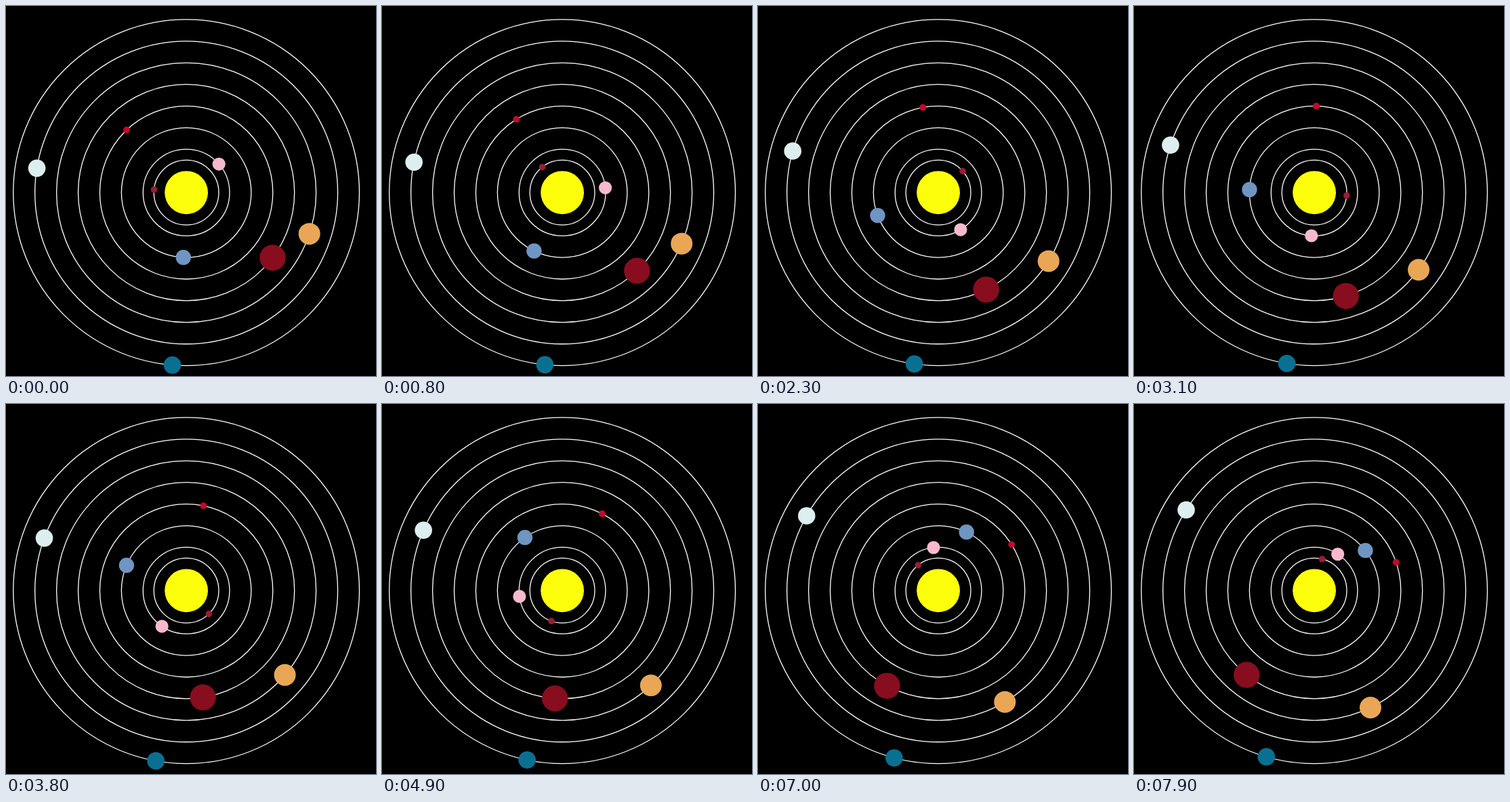
These frames come from a looping animation (546x546 px, 8000 ms). An HTML page with a canvas:

```html
<!DOCTYPE html>
<html>
<head>
<meta charset="utf-8">
<title>Planets</title>
<style>
  html, body { margin: 0; height: 100%; overflow: hidden; background: #000; }
  canvas { display: block; }
</style>
</head>
<body>
<canvas id="stage" width="546" height="546"></canvas>
<script>
const ctx = document.getElementById('stage').getContext('2d');
const CX = 266.1, CY = 275.3, UNIT = 31.92;
const LOOP = 8000, STEP = 100;
const START = 94.63, SPEED = 1.451; // outermost planet: degrees, degrees per second

// orbit in units, angular speed relative to the outermost planet, radius, colour
const planets = [
  [1.5, 40, 4.8, '#9a1c37'],
  [2, 30, 9.6, '#f7b9cd'],
  [3, 20, 11.2, '#6f95c2'],
  [4, 10, 4.9, '#c4082c'],
  [5, 8, 19.2, '#880d1e'],
  [6, 4, 16, '#e9a756'],
  [7, 2, 12.8, '#dceeee'],
  [8, 1, 12.8, '#0a7092']
];

function circle(x, y, r) {
  ctx.beginPath();
  ctx.arc(x, y, r, 0, 2 * Math.PI);
}

function disc(x, y, r, color) {
  circle(x, y, r);
  ctx.fillStyle = color;
  ctx.fill();
}

function draw(ms) {
  ctx.fillStyle = '#000';
  ctx.fillRect(0, 0, 546, 546);
  ctx.strokeStyle = '#fff';
  ctx.lineWidth = 1.3;
  for (const [orbit] of planets) {
    circle(CX, CY, orbit * UNIT);
    ctx.stroke();
  }
  disc(CX, CY, UNIT, '#fdff0a');

  const base = (START + SPEED * ms / 1000) * Math.PI / 180;
  for (const [orbit, rate, size, color] of planets) {
    const a = base * rate, r = orbit * UNIT;
    disc(CX + r * Math.cos(a), CY + r * Math.sin(a), size, color);
  }
}

const begin = performance.now();
function tick() {
  const t = (performance.now() - begin) % LOOP;
  draw(Math.floor(t / STEP) * STEP);
  requestAnimationFrame(tick);
}
tick();
</script>
</body>
</html>
```
